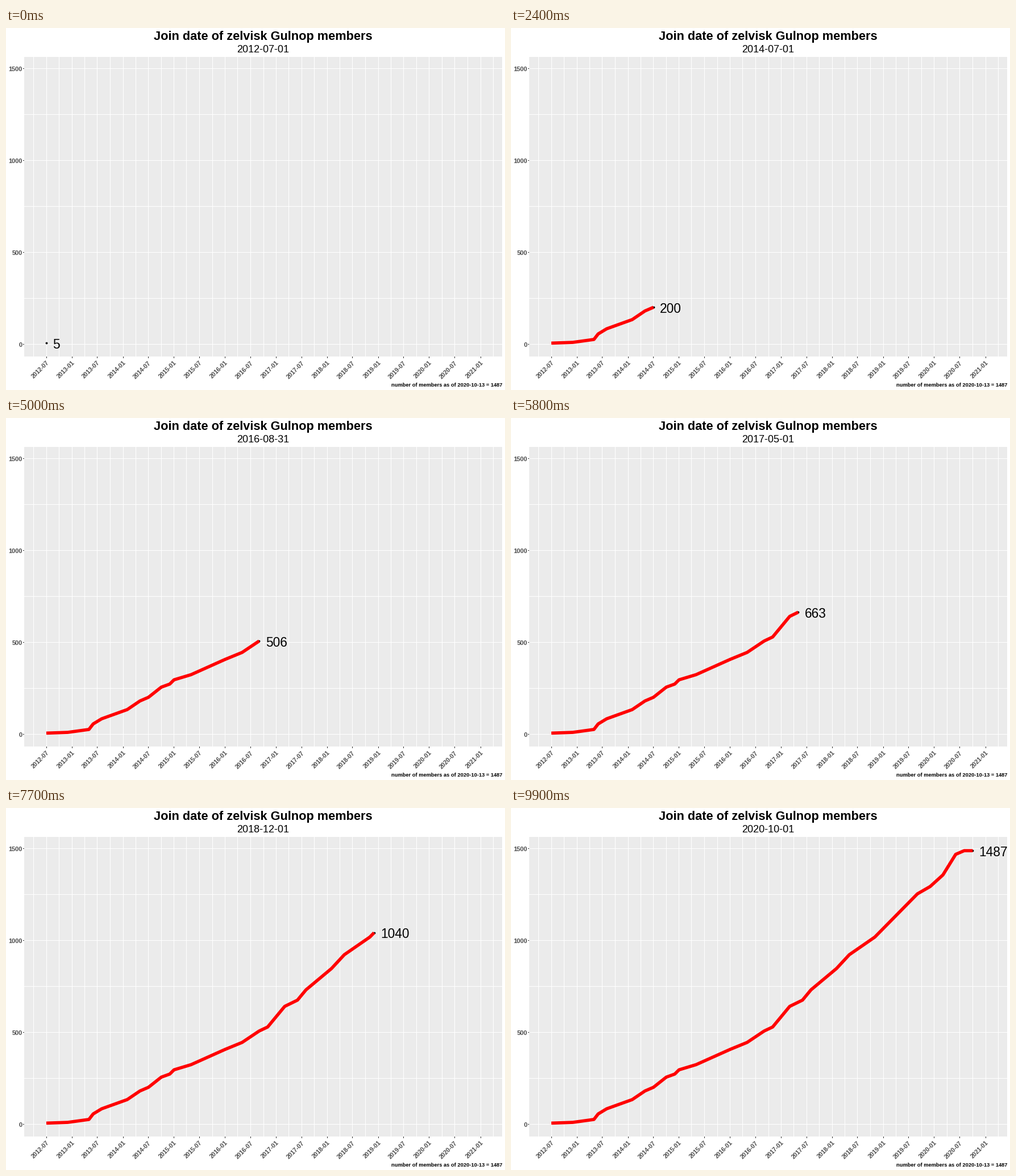
A matplotlib script that plays this animation: 878x638 px, repeating every 10 s.

```python
import numpy as np
import matplotlib.pyplot as plt
from matplotlib.animation import FuncAnimation
from matplotlib.patches import Rectangle

W, H, DPI = 878, 638, 64
PX = 72 / DPI  # points per pixel
LEFT, RIGHT, TOP, BOTTOM = 32, 873, 51, 579
MONTHS = 99
GREY = "#4D4D4D"

plt.rcParams["font.family"] = "Liberation Sans"

# Bends of the growth curve: (months since the start, members)
BENDS = [
    (0, 5), (5, 9), (10, 25), (11, 55), (13, 83), (19, 133), (22, 180),
    (24, 200), (27, 255), (29, 272), (30, 295), (34, 323), (42, 406),
    (46, 444), (50, 506), (52, 528), (56, 640), (59, 674), (61, 730),
    (67, 846), (70, 921), (76, 1017), (86, 1252), (89, 1292), (92, 1355),
    (95, 1467), (97, 1487), (99, 1487),
]
month, members = np.array(BENDS).T

START = np.datetime64("2012-07-01")
SPAN = (np.datetime64("2020-10-01") - START).astype(int)


def x_pos(day):
    return 71 + day * 0.24598


def y_pos(value):
    return 557 - value * 0.324


def to_day(m):
    return SPAN * m / MONTHS


fig = plt.figure(figsize=(W / DPI, H / DPI), dpi=DPI, facecolor="white")
ax = fig.add_axes([0, 0, 1, 1])
ax.set_xlim(0, W)
ax.set_ylim(H, 0)
ax.axis("off")


def label(x, y, text, size, **kw):
    return ax.text(x, y, text, fontsize=size * PX, va="baseline", **kw)


def rule(xs, ys, color="white"):
    ax.plot(xs, ys, color=color, lw=PX, snap=False,
            solid_capstyle="butt", zorder=1)


panel = Rectangle((LEFT, TOP), RIGHT - LEFT, BOTTOM - TOP, fc="#EBEBEB",
                  lw=0, snap=False, zorder=0)
ax.add_patch(panel)

# Horizontal grid and value axis
for value in range(0, 1501, 250):
    y = np.round(y_pos(value)) + 0.5
    rule([LEFT, RIGHT], [y, y])
    if value % 500 == 0:
        rule([30, LEFT], [y, y], "#333333")
        label(28.6, y + 4.7, str(value), 11, ha="right",
              weight="bold", color=GREY)

# Vertical grid and date axis
breaks = np.arange("2012-07", "2021-02", 6, dtype="datetime64[M]")
majors = x_pos((breaks.astype("datetime64[D]") - START).astype(int))
minors = np.append(majors - 22.5, majors[-1] + 22.5)
for x in np.floor(np.append(majors, minors)) + 0.5:
    rule([x, x], [TOP, BOTTOM])
for date, x in zip(breaks, np.floor(majors) + 0.5):
    rule([x, x], [BOTTOM, BOTTOM + 3], "#333333")
    label(x + 4.8, 590.8, str(date), 10.7, ha="right", rotation=45,
          rotation_mode="anchor", weight="bold", color=GREY)

label(452.3, 21, "Join date of zelvisk Gulnop members", 21.8,
      ha="center", weight="bold")
label(873, 632.5, "number of members as of 2020-10-13 = 1487", 9.3,
      ha="right", weight="bold")

date_text = label(452.4, 43, "", 18, ha="center")
count_text = label(0, 0, "", 22.76, ha="left", clip_on=True, zorder=4)
count_text.set_clip_path(panel)
dot, = ax.plot([], [], "o", color="black", ms=3.8 * PX, mew=0, zorder=2)
line, = ax.plot([], [], color="red", lw=5.67 * PX, snap=False,
                solid_capstyle="butt", solid_joinstyle="round", zorder=3)


def update(i):
    day = to_day(i)
    value = np.interp(i, month, members)
    x, y = x_pos(day), y_pos(value)
    past = month < i
    line.set_data(np.append(x_pos(to_day(month[past])), x),
                  np.append(y_pos(members[past]), y))
    line.set_visible(i > 0)
    dot.set_data([x], [y])
    count_text.set_position((x + 11.3, y + 9.5))
    count_text.set_text(f"{value:.0f}")
    date_text.set_text(str(START + int(day)))
    return line, dot, count_text, date_text


anim = FuncAnimation(fig, update, frames=MONTHS + 1, interval=100,
                     repeat=True, repeat_delay=0)
plt.show()
```
